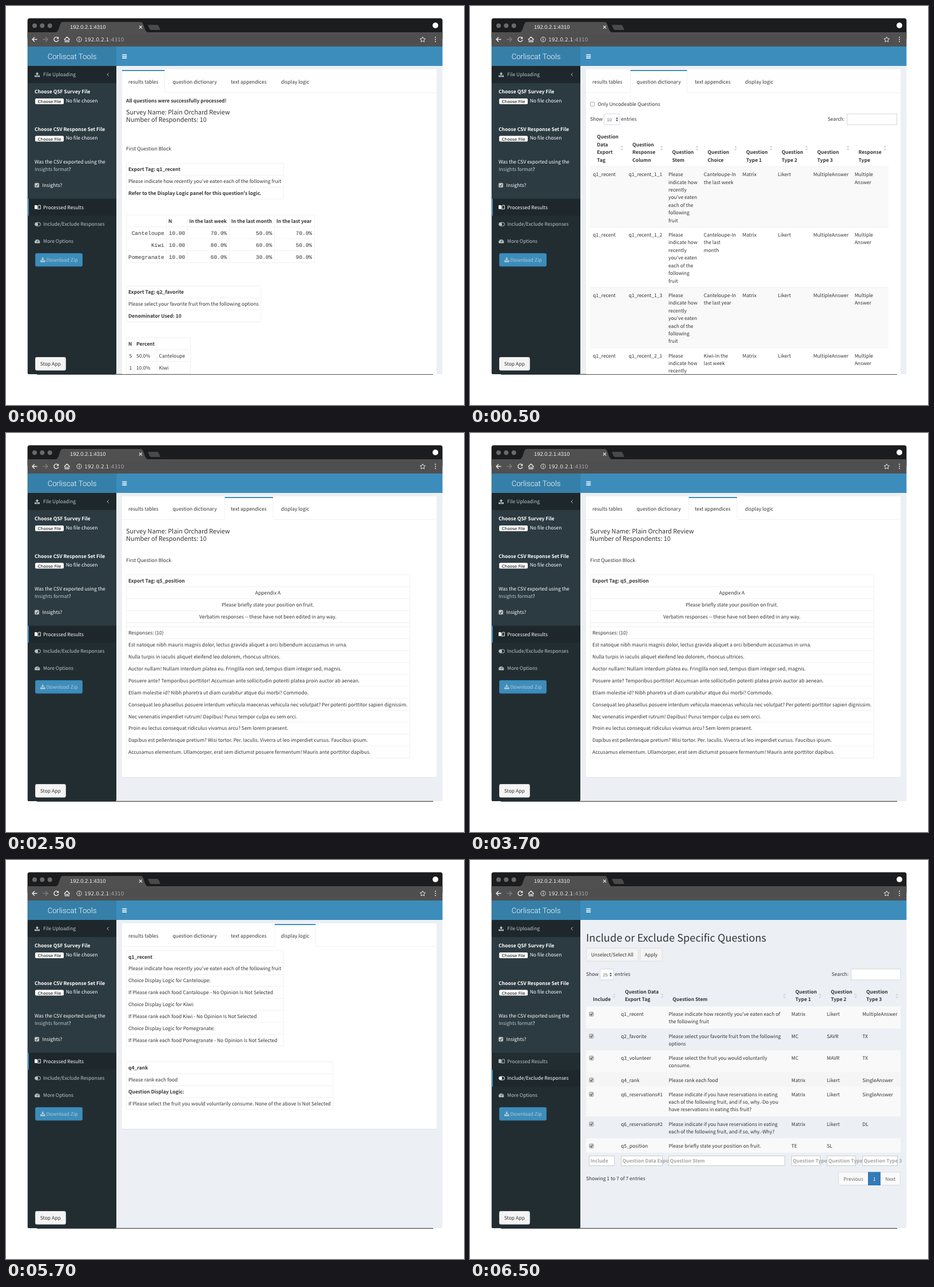
Write an HTML page that moves like this. It is 801 px wide and 699 px high and loops after 8000 ms.

```html
<!DOCTYPE html>
<html lang="en">
<head>
<meta charset="utf-8">
<title>Survey tool</title>
<style>
html, body { margin: 0; width: 100%; height: 100%; overflow: hidden; background: #fff; }
svg { display: block; width: 801px; height: 699px; }
text { font: 8.49px 'Noto Sans CJK SC', 'Noto Sans CJK JP', 'Source Sans Pro', sans-serif; fill: #333; text-rendering: geometricPrecision; }
.b { font-weight: 700; }
.mid { text-anchor: middle; }
.end { text-anchor: end; }
.h4 { font-size: 10.92px; }
.h2 { font-size: 18.2px; }
.white { fill: #fff; }
.side { fill: #b8c7ce; }
.soft { fill: #666; }
.hint { fill: #a5a5a5; }
.mono { font: 9.5px 'Liberation Mono', monospace; }
.ui { font: 7.6px 'Liberation Sans', sans-serif; }
.pick { font: 7.2px 'DejaVu Sans', sans-serif; fill: #000; }
.logo { font: 300 13.2px Roboto, sans-serif; }
.tab { font: 9.35px 'Liberation Sans', sans-serif; fill: #f2f2f2; }
.url { font: 9.1px 'DejaVu Sans', sans-serif; fill: #e4e4e4; }
</style>
</head>
<body>
<svg id="stage" viewBox="0 0 801 699"></svg>
<script>
const LEFT = 37.6, TOP = 21.6, RIGHT = 763.4, BOTTOM = 645;

// y is the middle of the capitals
const text = (x, y, str, cls = '') => {
  const drop = /h2/.test(cls) ? 6 : /h4|logo/.test(cls) ? 4 : 3.1;
  return `<text x="${x}" y="${y + drop}" class="${cls}">${str}</text>`;
};
const lines = (x, y, str, cls, step = 13.45) =>
  str.split('|').map((s, i) => text(x, y + i * step, s, cls)).join('');
const rect = (x, y, x2, y2, fill, stroke = 'none', r = 0) =>
  `<rect x="${x}" y="${y}" width="${x2 - x}" height="${y2 - y}" rx="${r}" fill="${fill}" stroke="${stroke}"/>`;
const path = (d, fill, stroke = 'none', w = 1) =>
  `<path d="${d}" fill="${fill}" stroke="${stroke}" stroke-width="${w}"/>`;
const circle = (x, y, r, fill, stroke = 'none') =>
  `<circle cx="${x}" cy="${y}" r="${r}" fill="${fill}" stroke="${stroke}"/>`;
const rows = (y, n) => Array.from({ length: n + 1 }, (_, i) => y + i * 20.9);

function grid(xs, ys) {
  const [l, r, t, b] = [xs[0], xs.at(-1), ys[0], ys.at(-1)];
  return path(xs.map(x => `M${x} ${t}V${b}`).join('') + ys.map(y => `M${l} ${y}H${r}`).join(''), 'none', '#f1f1f1');
}

// Bordered single-column table; rows starting with * are bold
function panel(y, right, str) {
  const list = str.split('|');
  return grid([210.5, right], rows(y, list.length)) + list.map((s, i) =>
    text(214, y + 10.6 + i * 20.9, s.replace('*', ''), s[0] == '*' ? 'b' : '')).join('');
}

const sorter = (x, y) => path(`M${x - 2.5} ${y - 1}l2.5 -3.6 2.5 3.6zM${x - 2.5} ${y + 1}l2.5 3.6 2.5 -3.6z`, '#d6d6d6');
const check = (x, y) => rect(x, y, x + 7.4, y + 7.4, '#cfcfcf', '#a2a2a2', 1.5) +
  path(`M${x + 1.8} ${y + 3.9}l1.5 1.7 2.6 -3.9`, 'none', '#555', 1.2);
const button = (x, y, x2, y2, label) => rect(x + .5, y + .5, x2 - .2, y2 - .2, '#f4f4f4', '#ddd', 2) +
  text((x + x2) / 2, (y + y2) / 2 + .3, label, 'mid');

function lengthAndSearch(x, y, count, selectX, selectR, searchX, right) {
  return text(x, y - .6, 'Show') + rect(selectX + .5, y - 9.5, selectR, y + 9.5, '#fff', '#d2d6de', 2) +
    text(selectX + 5.5, y + .6, count, 'ui soft') +
    path(`M${selectR - 7} ${y - .7}l2 -2.8 2 2.8zM${selectR - 7} ${y + .9}l2 2.8 2 -2.8z`, '#444') +
    text(selectR + 2, y - .6, 'entries') + text(searchX - 4, y - .6, 'Search:', 'end') +
    rect(searchX + .5, y - 9.5, right - .5, y + 9.5, '#fff', '#d2d6de');
}

function browser() {
  const ink = '#e8e8e8';
  return rect(LEFT, TOP, RIGHT, 60, '#1b1c1e', 'none', 4) + rect(LEFT, 46, RIGHT, 71, '#505050') +
    path('M86 46.5C94 46 93 28 99 28H236C242 28 241 46 249 46.5z', '#505050') +
    path('M248 33H264Q266 33 267 35L270 42H254Q252 42 251 40z', '#4a4a4a') +
    [50, 63.3, 76.7].map(x => circle(x, 34.4, 4, '#6a6a6a')).join('') +
    text(112, 37, '192.0.2.1:4310', 'tab') +
    path('M233 34.5l5 5m0 -5l-5 5', 'none', '#ddd', 1.2) +
    circle(751, 34, 5, '#fff') +
    rect(117, 50, 740, 67, '#4e4e4e', 'none', 2) +
    path('M54.5 58.5H46m4 -4l-4 4 4 4', 'none', ink, 1.4) +
    path('M64.5 58.5H73m-4 -4l4 4 -4 4', 'none', '#7d7d7d', 1.4) +
    path('M91.2 56A4 4 0 1 0 91.8 59.5', 'none', ink, 1.4) + path('M92.2 53.8v4h-4z', ink) +
    path('M101.8 59L106.7 54.2 111.6 59M103.4 58v5h2.3v-3h2v3h2.3v-5', 'none', ink, 1.2) +
    circle(128, 58.5, 4.2, 'none', ink) + path('M128 57.8v3M128 55.8v1.1', 'none', ink, 1.2) +
    text(137, 58.8, '192.0.2.1<tspan fill="#a6a6a6">:4310</tspan>', 'url') +
    path('M728.7 54l1.4 3 3.3 .4 -2.4 2.2 .6 3.3 -2.9 -1.6 -2.9 1.6 .6 -3.3 -2.4 -2.2 3.3 -.4z', 'none', ink) +
    [54.8, 58.5, 62.2].map(y => circle(751, y, 1, ink)).join('');
}

const upload = (x, y) => path(`M${x} ${y + 1.5}h2.6v1.2h3.8v-1.2h2.6v2.7h-9z`, '#b8c7ce') +
  path(`M${x + 4.5} ${y - 4}l3 3.2h-2v2.8h-2v-2.8h-2z`, '#b8c7ce');

const icons = [
  (y, c) => path(`M50 ${y - 3.4}q2.5 -1 4.8 .6v6.5q-2.5 -1.5 -4.8 -.5z`, c) +
    path(`M56 ${y - 2.8}q2 -1.4 4.3 -.6v6.6q-2.3 -.8 -4.3 .5z`, 'none', c, .9),
  (y, c) => rect(50.5, y - 3, 60.5, y + 3, 'none', c, 3) + circle(53.5, y, 2.6, c),
  (y, c) => path(`M50.4 ${y + 3.5}a4.7 4.7 0 1 1 8.6 0z`, c) +
    path(`M54.5 ${y + 2}l1.5 -4M52 ${y}h1M57 ${y + .5}h1`, 'none', '#222d32', .9)
];

function sidebar(active) {
  const items = ['Processed Results', 'Include/Exclude Responses', 'More Options'];
  const filePick = (y, kind) => text(50, y, `Choose ${kind} File`, 'b white') +
    rect(51, y + 12, 101, y + 22, '#fff', 'none', 2) + text(76, y + 17.2, 'Choose File', 'pick mid') +
    text(104.7, y + 15.5, 'No file chosen', 'white');
  return rect(LEFT, 105, 193, BOTTOM, '#222d32', 'none', 2) + rect(LEFT, 105, 193, 135, '#1e282c') +
    rect(LEFT, 135, 193, 337.5, '#2c3b41') +
    upload(50, 120) + text(65, 120, 'File Uploading', 'side') +
    path('M179.5 117.5l-2.5 2.7 2.5 2.7', 'none', '#b8c7ce') +
    filePick(150, 'QSF Survey') + filePick(215.4, 'CSV Response Set') +
    text(50, 272.5, 'Was the CSV exported using the', 'white') +
    text(50, 286, '<tspan fill="#b8c7ce">Insights format</tspan>?', 'white') +
    check(50.3, 310.3) + text(63.5, 314.3, 'Insights?', 'white') +
    items.map((s, i) => {
      const y = 352.6 + i * 29.7, on = i == active;
      return (on ? rect(LEFT, y - 14.8, 193, y + 14.8, '#1e282c') + rect(LEFT, y - 14.8, 40, y + 14.8, '#3c8dbc') : '') +
        icons[i](y, on ? '#fff' : '#b8c7ce') + text(65, y, s, on ? 'white' : 'side');
    }).join('') +
    rect(51.5, 433.5, 133.5, 456, '#3c8dbc', '#367fa9', 2) +
    path('M60 445.5h2.6l1.7 1.5 1.7 -1.5h2.6v3.2h-8.6zM63.3 440.5h2v2.5h1.9l-2.9 3 -2.9 -3h1.9z', '#b8c7ce') +
    text(70.5, 445, 'Download Zip', 'side') + button(51, 615, 104.5, 638.3, 'Stop App');
}

function frame() {
  return rect(LEFT, 71, RIGHT, BOTTOM, '#ecf0f5', 'none', 2) + browser() +
    rect(LEFT, 71, 193, 105, '#367fa9') + rect(193, 71, RIGHT, 105, '#3c8dbc') +
    text(115.5, 88.5, 'Corliscat Tools', 'logo white mid') +
    path('M203.2 85.5h8M203.2 88.4h8M203.2 91.3h8', 'none', '#fff', 1.5) +
    path('M54 645.3H747', 'none', '#222');
}

function tabs(active, bottom) {
  const names = ['results tables', 'question dictionary', 'text appendices', 'display logic'];
  const starts = [214, 291.5, 393.3, 481];
  const [l, r] = [[203, 277.5], [280.5, 379.5], [382.5, 467], [470, 541.5]][active];
  return rect(203, 112, 753, bottom + 1, '#dde1e6', 'none', 2) + rect(203, 111, 753, bottom, '#fff', 'none', 2) +
    path(`M203 151.5H${l}V113M${r} 113V151.5H753`, 'none', '#f1f1f1') + rect(l, 112, r, 114, '#3c8dbc') +
    names.map((s, i) => text(starts[i], 133, s)).join('');
}

const survey = y => text(210, y, 'Survey Name: Plain Orchard Review', 'h4') +
  text(210, y + 13, 'Number of Respondents: 10', 'h4');

function results() {
  const fruit = ['Canteloupe 10.00 70.0% 50.0% 70.0%', 'Kiwi 10.00 80.0% 60.0% 50.0%', 'Pomegranate 10.00 60.0% 30.0% 90.0%'];
  const ends = [276.7, 313.3, 386.3, 465.5, 535.3], heads = ['N', 'In the last week', 'In the last month', 'In the last year'];
  return tabs(0, 660) + text(210, 165.5, 'All questions were successfully processed!', 'b') +
    survey(185.5) + text(210, 250, 'First Question Block') +
    panel(275.5, 485.5, "*Export Tag: q1_recent|Please indicate how recently you've eaten each of the following fruit|*Refer to the Display Logic panel for this question's logic.") +
    grid([210.5, 280.5, 317, 390.5, 469.5, 539.5], rows(366, 4)) +
    heads.map((s, i) => text([284, 320.5, 394, 473][i], 376.7, s, 'b')).join('') +
    fruit.map((row, j) => row.split(' ').map((s, i) => text(ends[i], 397.7 + j * 20.9, s, 'mono end')).join('')).join('') +
    panel(490.5, 446, '*Export Tag: q2_favorite|Please select your favorite fruit from the following options|*Denominator Used: 10') +
    grid([210.5, 224, 264, 322.5], rows(581, 3)) +
    text(214, 591.5, 'N', 'b') + text(228, 591.5, 'Percent', 'b') +
    lines(215.5, 612.5, '5|1', '', 20.9) + lines(228, 612.5, '50.0%|10.0%', '', 20.9) +
    lines(267.5, 612.5, 'Canteloupe|Kiwi', '', 20.9);
}

function dictionary() {
  const heads = ['Question|Data|Export|Tag', 'Question|Response|Column', 'Question|Stem', 'Question|Choice',
    'Question|Type 1', 'Question|Type 2', 'Question|Type 3', 'Response|Type'];
  const headX = [222, 284, 353.5, 415.5, 483, 545, 607.3, 679.5], sortX = [265.5, 335, 397, 464.5, 526.5, 588.5, 661, 725.5];
  const cellX = [215, 277.5, 347, 408.8, 476.5, 538.5, 600.5, 672.7];
  const choices = ['Canteloupe-In|the last week', 'Canteloupe-In|the last|month', 'Canteloupe-In|the last year', 'Kiwi-In the|last week'];
  const stem = "Please|indicate how|recently|you've eaten|each of the|following|fruit";
  return tabs(1, 660) + rect(210.5, 168.5, 217.5, 175.5, '#fff', '#aaa', 1.5) +
    text(223.3, 172, 'Only Uncodeable Questions') + lengthAndSearch(210, 198.5, '10', 234, 262, 659, 747) +
    heads.map((s, i) => lines(headX[i], 269.5 - 13.45 * (s.split('|').length - 1), s, 'b') + sorter(sortX[i], 249)).join('') +
    choices.map((choice, j) => {
      const y = 295 + j * 105.8;
      const cells = ['q1_recent', 'q1_recent_' + ['1_1', '1_2', '1_3', '2_1'][j], stem, choice, 'Matrix', 'Likert', 'MultipleAnswer', 'Multiple|Answer'];
      return rect(210, y - 13.5, 732, y + 92.3, j % 2 ? '#fff' : '#f9f9f9') +
        path(`M210 ${y - 13.5}H732`, 'none', '#f1f1f1') + cells.map((s, i) => lines(cellX[i], y, s)).join('');
    }).join('');
}

function appendices() {
  const answers = 'Responses: (10)|Est natoque nibh mauris magnis dolor, lectus gravida aliquet a orci bibendum accusamus in urna.|' +
    'Nulla turpis in iaculis aliquet eleifend leo dolorem, rhoncus ultrices.|' +
    'Auctor nullam! Nullam interdum platea eu. Fringilla non sed, tempus diam integer sed, magnis.|' +
    'Posuere ante? Temporibus porttitor! Accumsan ante sollicitudin potenti platea proin auctor ab aenean.|' +
    'Etiam molestie id? Nibh pharetra ut diam curabitur atque dui morbi? Commodo.|' +
    'Consequat leo phasellus posuere interdum vehicula maecenas vehicula nec volutpat? Per potenti porttitor sapien dignissim.|' +
    'Nec venenatis imperdiet rutrum! Dapibus! Purus tempor culpa eu sem orci.|' +
    'Proin eu lectus consequat ridiculus vivamus arcu? Sem lorem praesent.|' +
    'Dapibus est pellentesque pretium? Wisi tortor. Per. Iaculis. Viverra ut leo imperdiet cursus. Faucibus ipsum.|' +
    'Accusamus elementum. Ullamcorper, erat sem dictumst posuere fermentum! Mauris ante porttitor dapibus.';
  return tabs(2, 603) + survey(172) + text(210, 223, 'First Question Block') +
    grid([210.5, 706], rows(248.5, 4)) + text(214, 259.2, 'Export Tag: q5_position', 'b') +
    lines(458, 280.1, 'Appendix A|Please briefly state your position on fruit.|Verbatim responses -- these have not been edited in any way.', 'mid', 20.9) +
    grid([210.5, 706], [332.1, 339.5]) + panel(339.5, 706, answers);
}

function logic() {
  const rule = s => `Choice Display Logic for ${s}:|If Please rank each food ${s.replace('nte', 'nta')} - No Opinion Is Not Selected`;
  return tabs(3, 471) +
    panel(158.8, 485.5, "*q1_recent|Please indicate how recently you've eaten each of the following fruit|" +
      ['Canteloupe', 'Kiwi', 'Pomegranate'].map(rule).join('|')) +
    panel(353.5, 572, '*q4_rank|Please rank each food|*Question Display Logic:|If Please select the fruit you would voluntarily consume. None of the above Is Not Selected');
}

function include() {
  const cellX = [264, 347.5, 562, 624, 686.2];
  const heads = [[215, 'Include', 252], [271, 'Question Data|Export Tag', 336], [354.3, 'Question Stem', 550],
    [569, 'Question|Type 1', 612], [631, 'Question|Type 2', 674.5], [693, 'Question|Type 3', 746.5]];
  const items = [
    [256.5, '#f9f9f9', 'q1_recent', "Please indicate how recently you've eaten each of|the following fruit", 'Matrix', 'Likert', 'MultipleAnswer'],
    [295, '', 'q2_favorite', 'Please select your favorite fruit from the following|options', 'MC', 'SAVR', 'TX'],
    [333.5, '#f9f9f9', 'q3_volunteer', 'Please select the fruit you would voluntarily|consume.', 'MC', 'MAVR', 'TX'],
    [372, '#f5f5f5', 'q4_rank', 'Please rank each food', 'Matrix', 'Likert', 'SingleAnswer'],
    [397, '#f9f9f9', 'q6_reservations#1', 'Please indicate if you have reservations in eating|each of the following fruit, and if so, why.-Do you|have reservations in eating this fruit?', 'Matrix', 'Likert', 'SingleAnswer'],
    [449, '', 'q6_reservations#2', 'Please indicate if you have reservations in eating|each of the following fruit, and if so, why.-Why?', 'Matrix', 'Likert', 'DL'],
    [487.5, '#f9f9f9', 'q5_position', 'Please briefly state your position on fruit.', 'TE', 'SL', '']];
  const filters = [[208, 253, 'Include'], [264, 337, 'Question Data Export Tag'], [347, 551, 'Question Stem'],
    [562, 613, 'Question Type 1'], [624, 675, 'Question Type 2'], [686, 748, 'Question Type 3']];
  return text(203, 137, 'Include or Exclude Specific Questions', 'h2') +
    button(203, 154, 294.5, 177.3, 'Unselect/Select All') + button(297, 154, 336.5, 177.3, 'Apply') +
    lengthAndSearch(203, 200.5, '25', 227, 251, 666, 753.5) +
    heads.map(([x, s, sx]) => lines(x, s.includes('|') ? 230.8 : 244.2, s, 'b') + sorter(sx, 238)).join('') +
    items.map(([y, fill, ...cells], j) => rect(203, y, 753, items[j + 1]?.[0] ?? 512.5, fill || 'none') +
      check(208.6, y + 9.8) + cells.map((s, i) => lines(cellX[i], y + 13.4, s)).join('')).join('') +
    filters.map(([l, r, s]) => rect(l + .5, 518.5, r - .5, 535.5, '#fff', '#ccc') +
      `<svg x="${l}" y="518" style="width:${r - l - 2}px;height:18px">${text(2.5, 9.2, s, 'b hint')}</svg>`).join('') +
    text(203, 558, 'Showing 1 to 7 of 7 entries') +
    rect(644.5, 547, 752.5, 569.5, '#fafafa', '#ddd', 1) + rect(696, 546.5, 718, 570, '#337ab7') +
    text(670.5, 558.5, 'Previous', 'mid soft') + text(707, 558.5, '1', 'mid white') + text(735.3, 558.5, 'Next', 'mid soft');
}

const views = [results, dictionary, appendices, logic, include];
const starts = [0, 500, 2500, 4500, 6500];
const stage = document.getElementById('stage');
stage.innerHTML = `<clipPath id="page">${rect(LEFT, 105, RIGHT, BOTTOM, '#000')}</clipPath>` + frame() +
  views.map((view, i) => `<g class="view" clip-path="url(#page)">${view()}${sidebar(i == 4 ? 1 : 0)}</g>`).join('');
const groups = stage.querySelectorAll('.view');
let shown = -1;

const origin = performance.now();
function tick() {
  const t = (performance.now() - origin) % 8000;
  const now = starts.findLastIndex(s => t >= s);
  if (now != shown) groups.forEach((g, i) => g.style.display = i == now ? '' : 'none');
  shown = now;
  requestAnimationFrame(tick);
}
tick();
</script>
</body>
</html>
```
